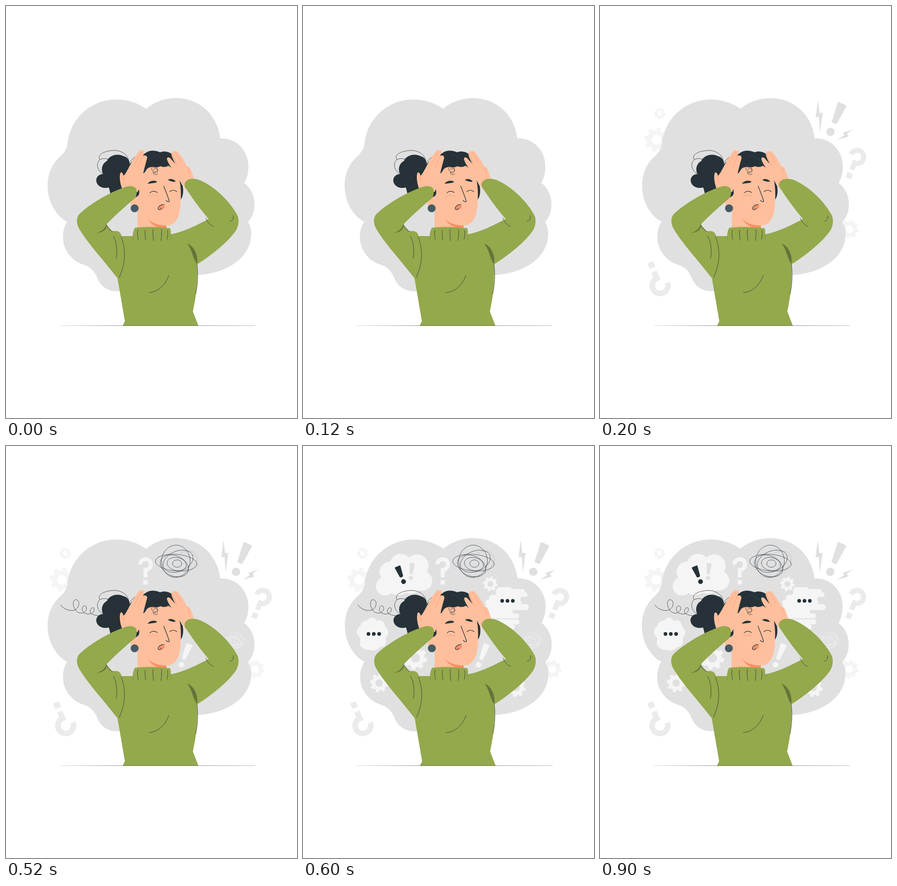
Write an HTML page with a canvas that moves like this. It is 629 px wide and 890 px high and loops after 1100 ms.

```html
<!DOCTYPE html>
<html lang="en">
<head>
<meta charset="utf-8">
<title>Overwhelmed</title>
<style>
html, body { margin: 0; width: 100%; height: 100%; overflow: hidden; background: #fff; }
canvas { display: block; width: 100vw; height: 100vh; }
</style>
</head>
<body>
<canvas id="stage" width="629" height="890"></canvas>
<script>
const ctx = document.getElementById('stage').getContext('2d');
const TAU = Math.PI * 2;
const INK = '#263238', GREEN = '#94a84c', SKIN = '#ffbf9d', BLUSH = '#ff8f66';
const GREY = '#e0e0e0', MID = '#ebebeb', PALE = '#f5f5f5';

function fill(d, color) {
  ctx.fillStyle = color;
  ctx.fill(new Path2D(d));
}

function line(d, color = INK, width = 0.8) {
  ctx.strokeStyle = color;
  ctx.lineWidth = width;
  ctx.lineCap = ctx.lineJoin = 'round';
  ctx.stroke(new Path2D(d));
}

function dot(x, y, r, color) {
  ctx.fillStyle = color;
  ctx.beginPath();
  ctx.arc(x, y, r, 0, TAU);
  ctx.fill();
}

function gear(x, y, r, color, turn = 0.2) {
  ctx.save();
  ctx.translate(x, y);
  ctx.rotate(turn);
  ctx.strokeStyle = color;
  ctx.lineCap = 'butt';
  ctx.lineWidth = r * 0.4;
  ctx.beginPath();
  ctx.arc(0, 0, r * 0.6, 0, TAU);
  ctx.stroke();
  ctx.lineWidth = r * 0.36;
  for (let i = 0; i < 8; i++) {
    ctx.rotate(TAU / 8);
    ctx.beginPath();
    ctx.moveTo(r * 0.7, 0);
    ctx.lineTo(r, 0);
    ctx.stroke();
  }
  ctx.restore();
}

// Hook centred on x, y; the square dot sits "drop" below it.
function question(x, y, r, w, drop, degrees, color) {
  ctx.save();
  ctx.translate(x, y);
  ctx.rotate(degrees * TAU / 360);
  ctx.strokeStyle = ctx.fillStyle = color;
  ctx.lineWidth = w;
  ctx.lineCap = 'butt';
  ctx.lineJoin = 'miter';
  ctx.beginPath();
  ctx.arc(0, 0, r, Math.PI, Math.PI / 2);
  ctx.lineTo(0, drop - w * 1.25);
  ctx.stroke();
  const s = w * 1.1;
  ctx.fillRect(-s / 2, drop - s / 2, s, s);
  ctx.restore();
}

// Tapered bar from the top centre down to the dot.
function exclaim(x, y, top, length, drop, r, degrees, color) {
  ctx.save();
  ctx.translate(x, y);
  ctx.rotate(degrees * TAU / 360);
  ctx.fillStyle = ctx.strokeStyle = color;
  ctx.lineWidth = 4;
  ctx.lineJoin = 'round';
  const a = top / 2 - 2, b = top * 0.3 - 2;
  ctx.beginPath();
  ctx.moveTo(-a, 2);
  ctx.lineTo(a, 2);
  ctx.lineTo(b, length - 2);
  ctx.lineTo(-b, length - 2);
  ctx.closePath();
  ctx.fill();
  ctx.stroke();
  dot(0, drop, r, color);
  ctx.restore();
}

const rings = [
  [0, 2, 45, 18, 0.08], [-1, -1, 31, 35, 0.1], [-4, 9, 32, 22, 0.4],
  [4, -1, 34, 22, -0.4], [1, 5, 21, 14, 0.2], [2, 4, 10, 8, 0]
];

function scribble(x, y, scale, color, width) {
  ctx.save();
  ctx.translate(x, y);
  ctx.scale(scale, scale);
  ctx.strokeStyle = color;
  ctx.lineWidth = width / scale;
  for (const [dx, dy, rx, ry, turn] of rings) {
    ctx.beginPath();
    ctx.ellipse(dx, dy, rx, ry, turn, 0, TAU);
    ctx.stroke();
  }
  ctx.restore();
}

function dots(x, y) {
  for (const dx of [-11.5, 0, 11.5]) dot(x + dx, y, 4, INK);
}

function outerSigns() {
  gear(128, 232, 12.5, PALE);
  gear(121, 289, 26, PALE);
  gear(538.5, 482, 20, PALE);
  fill('M470 203L465.500 240L472.500 240L474.500 274L480.500 231L473.500 231Z', GREY);
  fill('M545 267L524 274L527 279L512 289L537 282L533 276Z', GREY);
  exclaim(523, 211, 20, 46, 66, 9, 23, GREY);
  question(555, 326, 14.2, 11, 44, 23, MID);
  question(129, 604, 17, 12, 48, 157, MID);
}

function backdrop() {
  fill('M133 298C138 243 184 202 238 202C262 202 285 209 303 222C320 207 343 199 368 199' +
    'C418 199 458 236 463 286C497 284 524 312 524 346C524 360 521 372 515 382' +
    'C529 393 537 409 537 428C537 445 532 457 523 467C528 474 530 482 530 492' +
    'C530 543 478 578 415 581L245 616C222 618 205 606 198 589C192 574 184 564 168 559' +
    'C142 551 123 527 123 499C123 486 126 476 132 466C106 452 90 421 90 388' +
    'C90 364 99 343 113 329C125 318 131 310 133 298Z', GREY);
}

function worries() {
  question(301.5, 256, 11.5, 8.5, 38.5, 0, PALE);
  exclaim(397, 428, 14, 36, 48, 6, 22, PALE);
  line('M355 281C382 286 411 267 413 244C411 224 390 224 376 232', '#a8abad', 0.6);
  scribble(368, 250, 1, INK, 0.75);
  scribble(496, 420, 0.5, '#f2f2f2', 0.8);
  line('M118 343C124 353 140 358 149 354C159 349 161 333 151 332C142 332 144 352 155 359' +
    'C167 366 179 353 172 346C164 342 160 359 173 362C184 366 193 357 190 350' +
    'C185 346 177 359 186 363C192 366 199 367 207 367');
}

function thoughts() {
  for (const [x, y, r] of [[177, 303, 20], [187, 272, 22], [211, 257, 24],
    [246, 259, 25], [258, 291, 21], [233, 292, 27], [205, 295, 27]]) dot(x, y, r, PALE);
  exclaim(203.5, 260, 13, 25, 35.5, 5.2, -22, INK);
  exclaim(235.5, 253, 11, 24, 32, 4.4, 5, GREY);

  fill('M127 435C117 428 127 420 121 412C112 405 117 391 124 389C124 379 134 378 139 376' +
    'C145 367 156 370 159 378C168 373 178 381 176 390C187 397 185 409 178 415' +
    'C181 427 176 434 167 434C158 443 148 443 142 440C137 441 131 439 127 435Z', PALE);
  dots(152.5, 406);

  line('M423 310L446 310M421 321L480 321M421 314L474 314', PALE, 10);
  line('M408 328L464 328M400 338L465 338M400 348L481 348', PALE, 13);
  line('M407 358L448 358M407 367L461 367M420 380L462 380M432 391L452 391', PALE, 11);
  dots(441.5, 334.5);

  gear(404.5, 298, 15.5, PALE);
  gear(164, 512, 20, PALE);
  gear(242.5, 458, 25, PALE);
  gear(460.5, 522, 20, PALE);
}

function hairBack() {
  fill('M226 406C224 400 224 396 222 392C208 396 195 388 195 376C196 367 203 363 210 363' +
    'C204 352 209 339 218 335C223 322 242 318 253 324C264 326 269 337 267 347' +
    'L262 390L235 404Z', INK);
  line('M209 362C198 357 193 340 203 332C212 327 222 330 226 336');
  line('M203 332C195 322 212 312 236 312C254 313 267 325 266 341M264 342C270 333 279 324 289 321');
  fill('M375 376L382 389C384 400 383 412 377 419L374 418Z', INK);
}

function head() {
  fill('M283 410C273 411 267 423 270 431C274 436 280 435 286 431Z', SKIN);
  fill('M284 484L284 425C284 390 290 365 300 340L360 336C373 358 378 383 378 405' +
    'C378 438 376 474 347 474L347 484Z', SKIN);
  fill('M306 459C314 469 330 474 347 474L347 483C329 480 314 474 306 459Z', BLUSH);
  fill('M253 370C257 350 270 334 288 326L301 318C309 311 323 311 333 316C343 312 356 315 362 324' +
    'L378 372L364 358C360 350 356 348 351 345C345 349 338 348 334 346C329 349 322 349 317 347' +
    'C311 349 306 348 302 356C299 362 296 362 291 364Z', INK);
  fill('M284 388C290 393 287 398 288 401C289 407 285 412 280 413Z', INK);
  line('M319 326C322 320 332 322 334 328C342 328 346 334 351 339', '#3c4a50', 0.7);
  line('M315 354C312 348 321 346 326 350C331 356 321 361 317 357C315 352 328 348 328 355' +
    'C328 361 320 362 318 359C319 366 325 365 328 363');
}

function face() {
  fill('M306 384C310 378 318 376 326 379C327 383 318 382 306 384Z', INK);
  fill('M350 376C354 372 363 374 367 379C362 381 355 378 350 376Z', INK);
  line('M311 404C315 399 322 399 327 403M354 401C358 397 365 397 369 401', INK, 1.2);
  line('M341 389C345 400 350 411 353 422C351 424 348 422 346 420', INK, 1.3);
  line('M308 411C314 408 322 408 328 411', BLUSH);
  fill('M329 438C332 430 340 428 343 432C344 439 334 442 329 438Z', BLUSH);
  line('M342 429C334 428 328 434 329 439C332 441 335 440 336 437', INK, 1.2);
  dot(278, 437, 8.6, '#455a64');
}

function hands() {
  fill('M254 402C248 390 244 372 247 361C250 357 253 362 254 367C258 363 261 357 265 350' +
    'C272 336 280 322 288 313C291 309 295 311 293 315C297 308 301 312 299 318L296 324' +
    'C301 321 306 324 305 329C302 340 299 350 297 360C296 376 292 390 284 402Z', SKIN);
  line('M293 315C287 323 283 332 279 341M297 323C293 332 289 341 286 349M254 367C253 371 254 375 256 379',
    BLUSH, 0.7);
  fill('M388 396C380 383 372 370 364 358C357 349 350 339 348 331C347 326 353 326 356 330L366 341' +
    'C361 331 356 322 358 317C359 313 363 313 365 315C366 312 370 313 372 316' +
    'C380 326 388 338 392 348C397 347 399 351 400 356C403 362 406 370 407 378Z', SKIN);
  line('M365 315C370 323 375 331 379 339M359 320C363 330 367 338 371 346M392 348C394 354 396 359 397 364',
    BLUSH, 0.7);
}

function sweater() {
  fill('M270 389C261 388 245 396 235 400C206 413 176 433 160 448C152 456 152 466 156 477' +
    'C170 505 211 549 241 588L257 681L252 691L416 691L404 660C409 635 416 600 413 558' +
    'C441 541 481 509 497 485C503 475 504 463 501 454C488 427 456 394 425 379' +
    'C415 373 400 372 394 375C387 379 384 384 387 391C395 404 420 440 438 460' +
    'C415 472 385 488 356 493C357 487 356 481 354 480C335 477 300 476 279 479' +
    'C276 482 274 490 274 497L250 497C248 487 240 484 230 487L217 472' +
    'C230 458 255 435 279 415C283 410 284 396 280 393C277 390 273 389 270 389Z', GREEN);
  fill('M196 490C207 487 214 481 217 472C220 481 209 490 196 490Z', '#64743a');
  fill('M392 513C406 519 416 537 413 558C404 546 403 528 392 513Z', '#64743a');
  line('M217 472C220 480 225 485 231 487M232 497C240 512 241 530 238 545M249 499C261 530 257 559 245 586');
  line('M309 619C329 618 345 602 352 582M413 558C416 582 414 604 410 622');
  line('M432 458C436 468 441 473 448 476M484 465C490 464 493 459 491 453');
  line('M285 484C284 491 284 498 286 504M301 484C300 492 301 499 302 506M318 482C317 491 318 500 319 507' +
    'M336 483C337 491 336 499 335 507M349 485C350 491 350 498 348 504');
  line('M274 497L275 506M356 493L356 506', '#7c8f3e', 0.7);
}

function ground() {
  const g = ctx.createLinearGradient(116, 0, 539, 0);
  g.addColorStop(0, 'rgba(38,50,56,0.2)');
  g.addColorStop(0.3, 'rgba(38,50,56,0.65)');
  g.addColorStop(0.7, 'rgba(38,50,56,0.65)');
  g.addColorStop(1, 'rgba(38,50,56,0.4)');
  ctx.fillStyle = g;
  ctx.fillRect(116, 690.2, 423, 0.8);
}

function draw(step) {
  ctx.setTransform(1, 0, 0, 1, 0, 0);
  ctx.fillStyle = '#fff';
  ctx.fillRect(0, 0, 629, 890);
  ctx.translate([0, 0.9, 0, 0.5][step], 0);
  if (step > 0) outerSigns();
  backdrop();
  if (step > 2) thoughts();
  if (step > 1) worries();
  hairBack();
  head();
  face();
  hands();
  sweater();
  ground();
}

const start = performance.now();

function tick() {
  const t = (performance.now() - start) % 1100;
  draw(Math.min(3, Math.floor(t / 200)));
  requestAnimationFrame(tick);
}
tick();
</script>
</body>
</html>
```
